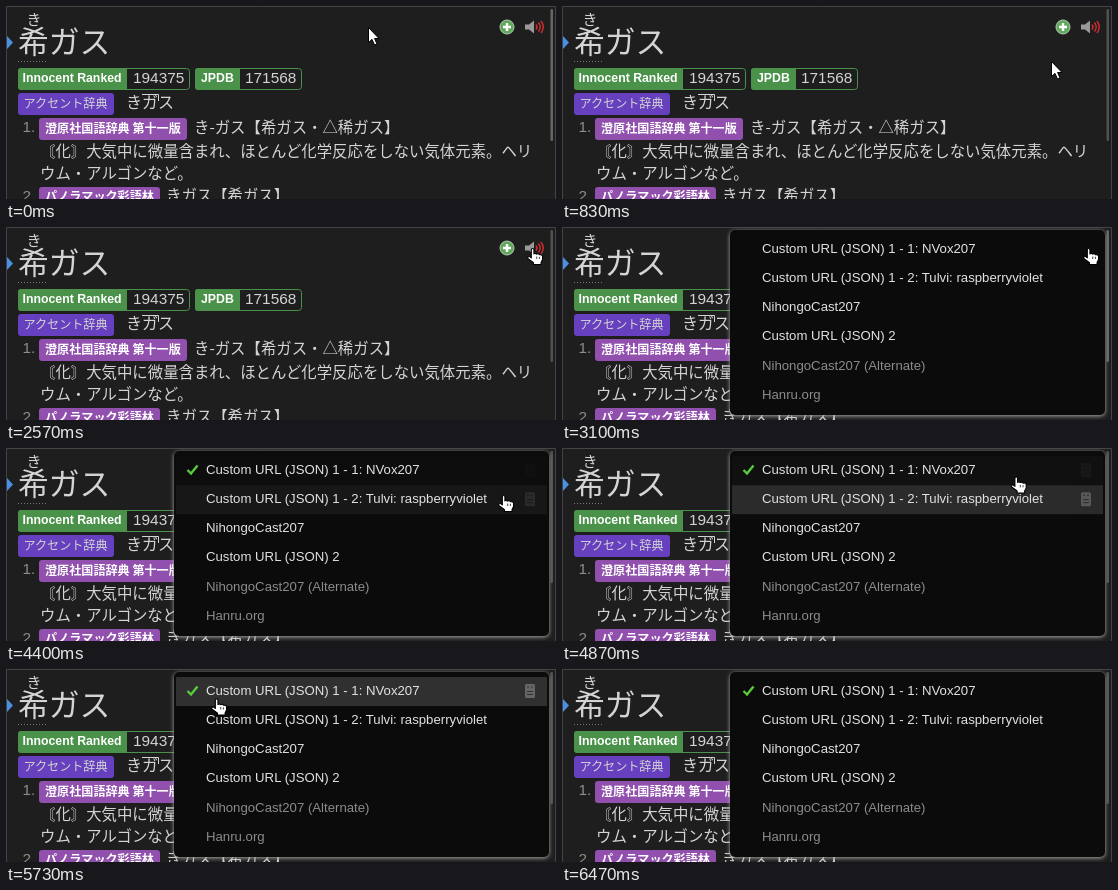
Recreate the animation shown at these times as an HTML page. Size 550 by 193 pixels, loop 6.73 s.

```html
<!DOCTYPE html>
<html lang="ja">
<head>
<meta charset="utf-8">
<style>
html, body { margin: 0; width: 100%; height: 100%; overflow: hidden; background: #1e1e1e; }
svg { display: block; width: 550px; height: 193px; }
text { font: 15.4px 'Noto Sans CJK JP', 'Noto Sans CJK', sans-serif; fill: #d4d4d4; white-space: pre; }
.latin { font-family: 'Liberation Sans', Arial, sans-serif; }
.label { font: bold 12.3px 'Liberation Sans', Arial, sans-serif; fill: #fff; }
.dict { font-size: 12.1px; font-weight: bold; fill: #fff; }
.item { font: 13.2px 'Liberation Sans', Arial, sans-serif; fill: #e2e2e2; }
.off { fill: #8c8c8c; }
.panel { fill: #0b0b0b; filter: drop-shadow(0 1px 2px #aaa); }
</style>
</head>
<body>
<svg viewBox="0 0 550 193">
  <rect width="550" height="193" fill="#1e1e1e"/>
  <path d="M.5 193V.5H549.5V193" fill="none" stroke="#444"/>
  <rect id="progress" x="1" y="1" height="2" fill="#1a73e8"/>
  <path d="M1 30L7 36.5L1 43Z" fill="#4a90e2"/>

  <text x="28" y="19" text-anchor="middle" style="font-size:15px">き</text>
  <text x="12" y="46.5" style="font-size:30.8px">希ガス</text>
  <path d="M12 55.5H42" stroke="#777" stroke-dasharray="1 2"/>

  <circle cx="501" cy="21" r="7" fill="#5fa95a" stroke="#b5c9b3"/>
  <path d="M501 17V25M497 21H505" stroke="#fff" stroke-width="2.4"/>
  <g id="speaker">
    <path d="M519 18.5H523L528 14.5V27.5L523 23.5H519Z" fill="#999"/>
    <path d="M530 18.5q2 2.5 0 5M532.5 16.5q3.5 4.5 0 9M535 15q4.5 6 0 12" fill="none" stroke="#d22f2f" stroke-width="1.4"/>
  </g>

  <g fill="none" stroke="#4a9249">
    <rect x="12.5" y="62.5" width="171" height="21" rx="3"/>
    <rect x="189.5" y="62.5" width="106" height="21" rx="3"/>
  </g>
  <path d="M15 62H121V84H15Q12 84 12 81V65Q12 62 15 62ZM192 62H234V84H192Q189 84 189 81V65Q189 62 192 62Z" fill="#4a9249"/>
  <text class="label" x="16.5" y="76">Innocent Ranked</text>
  <text class="latin" x="127" y="77">194375</text>
  <text class="label" x="195" y="76">JPDB</text>
  <text class="latin" x="239" y="77">171568</text>

  <rect x="12" y="87" width="96" height="22" rx="3" fill="#6640be"/>
  <text x="17.5" y="102" style="font-size:12.1px">アクセント辞典</text>
  <text x="120" y="102" style="font-size:16px">きガス</text>
  <path d="M136 88.5H152.5V95" fill="none" stroke="#d4d4d4"/>

  <text class="latin off" x="16.5" y="126">1.</text>
  <rect x="33" y="112" width="148" height="22" rx="3" fill="#9150ad"/>
  <text class="dict" x="39" y="126.5">澄原社国語辞典 第十一版</text>
  <text x="188" y="127">き-ガス【希ガス・△稀ガス】</text>
  <text x="34" y="151">〘化〙大気中に微量含まれ、ほとんど化学反応をしない気体元素。ヘリ</text>
  <text x="34" y="173">ウム・アルゴンなど。</text>
  <text class="latin off" x="16.5" y="195">2.</text>
  <rect x="33" y="181" width="121" height="22" rx="3" fill="#9150ad"/>
  <text class="dict" x="39" y="195">パノラマック彩語林</text>
  <text x="160" y="195">きガス【希ガス】</text>
  <rect id="scrollbar" x="544.5" y="3" width="2.5" height="132" rx="1.2" fill="#666"/>

  <g id="menu">
    <rect class="panel" x="168" y="3" width="375" height="185" rx="5"/>
  </g>
  <g id="cursor" stroke="#000" fill="#fff" stroke-linejoin="round">
    <path id="arrow" d="M.5 .5V15.5L4 12.4L6.5 18L9 17L6.6 11.5H11Z"/>
    <g id="hand" transform="translate(-1 0) scale(1.08 1)">
      <path d="M4 1.7C4 .2 6.4 .2 6.4 1.7V6Q7.7 4.8 9 6.2Q10.4 5.2 11.6 6.8Q13.6 6.2 14.4 8V11.5L13 14.5V16.5H6V14.6L1 10.6C0 9.2 1.6 7.9 2.8 8.9L4 10Z"/>
      <path d="M9 8.5V11M11.5 8.8V11" stroke-width=".7"/>
    </g>
  </g>
</svg>
<script>
const LOOP = 6730, FADE = 130, ROW = 29.2;
const $ = id => document.getElementById(id);
const menu = $('menu');

function add(tag, attrs, parent) {
  const el = document.createElementNS('http://www.w3.org/2000/svg', tag);
  for (const name in attrs) el.setAttribute(name, attrs[name]);
  return parent.appendChild(el);
}

// Hover background plus the small card button at its right end
const rows = [0, 1].map(i => {
  const row = add('g', { transform: `translate(0 ${i * ROW})` }, menu);
  add('rect', { x: 170, y: 8, width: 371, height: 29, fill: '#303030' }, row);
  add('rect', { x: 519, y: 15, width: 10, height: 14, rx: 1.5, fill: '#666' }, row);
  add('path', { d: 'M521 18H523M525 18H527M521 22.5H527M521 25.5H527', stroke: '#303030' }, row);
  return row;
});

['Custom URL (JSON) 1 - 1: NVox207', 'Custom URL (JSON) 1 - 2: Tulvi: raspberryviolet',
  'NihongoCast207', 'Custom URL (JSON) 2', 'NihongoCast207 (Alternate)', 'Hanru.org'
].forEach((label, i) => {
  add('text', { class: i > 3 ? 'item off' : 'item', x: 200, y: 25.7 + i * ROW }, menu).textContent = label;
});
const check = add('path', { d: 'M181.5 22L185 25.5L191.5 17.5', fill: 'none', stroke: '#58cc3c', 'stroke-width': 2.4 }, menu);

// Eased 0 to 1 from a start time over a duration
function ramp(t, start, duration = FADE) {
  const p = Math.max(0, Math.min(1, (t - start) / duration));
  return p * p * (3 - 2 * p);
}
const pulse = (t, on, off) => ramp(t, on) - ramp(t, off);

// Pointer moves: start, duration, dx, dy
const moves = [
  [330, 500, 127, 34], [970, 400, 33, -34],
  [4170, 230, -29, 26], [4500, 470, -49, -21],
  [5300, 600, -295, -3], [5300, 300, 0, 10], [5600, 300, 0, -10],
  [6130, 340, -76, -45]
];

const show = (el, on) => el.setAttribute('visibility', on ? 'inherit' : 'hidden');
const fade = (el, value) => el.setAttribute('opacity', value);

function draw(t) {
  let x = 362, y = 21;
  for (const [start, duration, dx, dy] of moves) {
    const p = ramp(t, start, duration);
    x += dx * p;
    y += dy * p;
  }
  const pointing = x > (t < 1400 ? 517 : 168);
  $('cursor').setAttribute('transform', `translate(${x} ${y})`);
  show($('hand'), pointing);
  show($('arrow'), !pointing);

  show(menu, t >= 3100);
  show(check, t >= 3130);
  fade(rows[0], pulse(t, 3100, 4290) + pulse(t, 4840, 5790));
  fade(rows[1], pulse(t, 4350, 4840));

  const loading = pulse(t, 1830, 2070);
  fade($('speaker'), 1 - .65 * loading);
  fade($('progress'), loading);
  $('progress').setAttribute('width', 548 * ramp(t, 1830, 370));
  fade($('scrollbar'), 1 - .3 * (ramp(t, 170, 660) - ramp(t, 2570) + ramp(t, 3830, 170)));
}

function tick() {
  draw(performance.now() % LOOP);
  requestAnimationFrame(tick);
}
tick();
</script>
</body>
</html>
```
